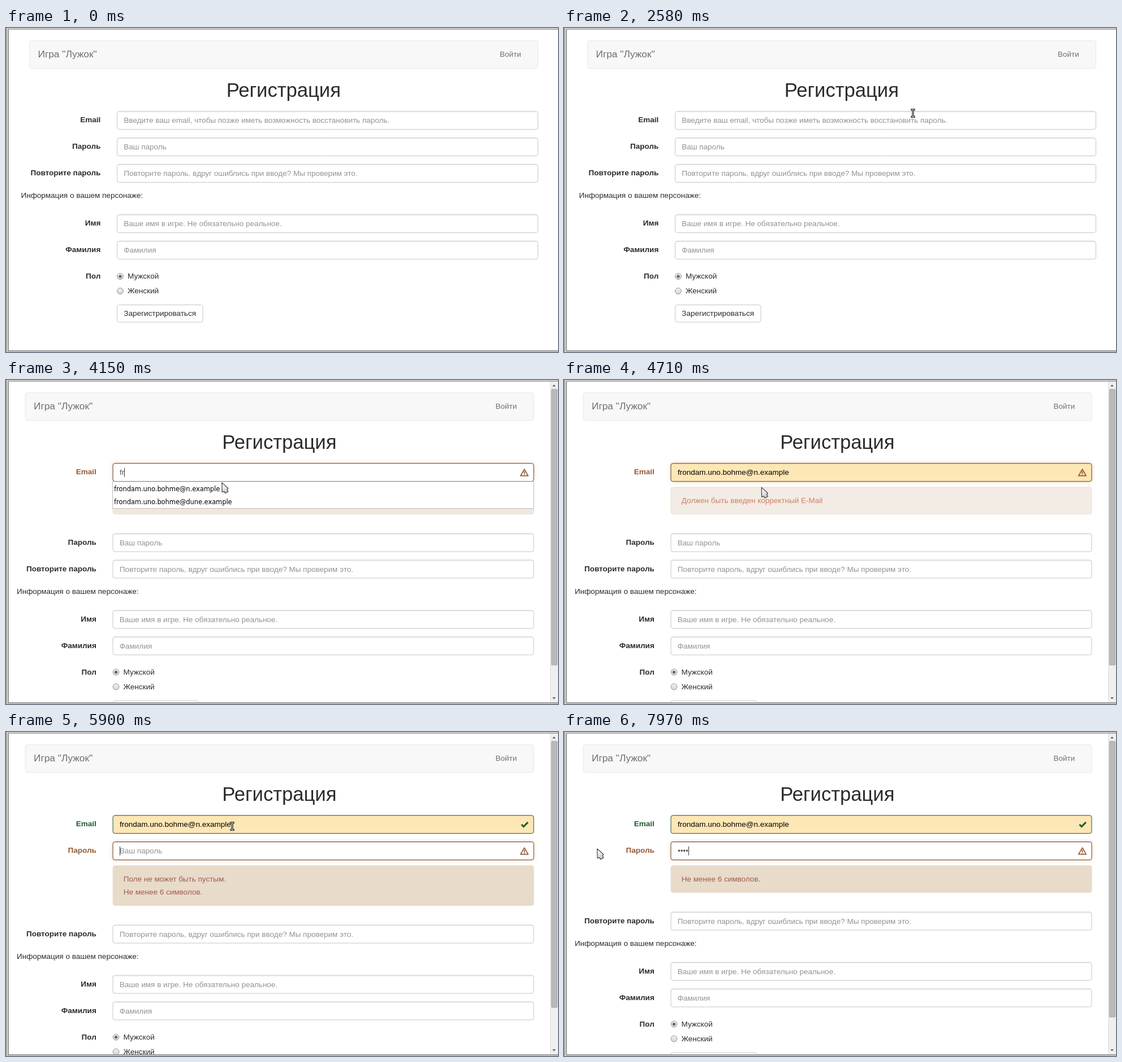
Animation, 976 px wide and 574 px high, one loop 8000 ms. Source, as an HTML page with a canvas:

```html
<!DOCTYPE html>
<html lang="ru">
<head>
<meta charset="utf-8">
<title>Регистрация</title>
<style>
html, body { margin: 0; width: 100%; height: 100%; overflow: hidden; background: #fff; }
canvas { display: block; width: 976px; height: 574px; }
</style>
</head>
<body>
<canvas id="stage"></canvas>
<script>
const W = 976, H = 574, LOOP = 8000;
const canvas = document.getElementById('stage');
const ctx = canvas.getContext('2d');
const dpr = window.devicePixelRatio || 1;
canvas.width = W * dpr;
canvas.height = H * dpr;

const SANS = '"Liberation Sans", Arial, sans-serif';
const TEXT = '13.5px ' + SANS;
const BOLD = 'bold ' + TEXT;
const MENU = '11.4px "DejaVu Sans", sans-serif';
const INK = '#2b2b2b', BROWN = '#935a33', GREEN = '#1e5c28';
const MAILS = ['frondam.uno.bohme@n.example', 'frondam.uno.bohme@dune.example'];

// Moments of the scenario, ms
const T = { focus: 3080, invalid: 3650, menu: 3860, pick: 4680, next: 5840, recheck: 7920 };
const MAIL_KEYS = [3650, 3800];
const PASS_KEYS = [7060, 7290, 7560, 7840];

// Pointer stops: time, x, y
const PATH = [
  [600, 720, 576], [1000, 592, 276], [1230, 606, 286], [1430, 606, 286],
  [1990, 720, 271], [2260, 720, 271], [2580, 617, 151], [2780, 617, 151],
  [3000, 600, 162], [3620, 600, 162], [4150, 381, 181], [4360, 340, 192],
  [4630, 340, 192], [5080, 439, 163], [5620, 439, 163], [5900, 400, 167],
  [6400, 58, 206], [LOOP, 58, 206]
];

const clamp = v => Math.max(0, Math.min(1, v));
const smooth = v => v * v * (3 - 2 * v);
const mix = (a, b, k) => a + (b - a) * k;
const mixRgb = (a, b, k) => `rgb(${a.map((v, i) => Math.round(mix(v, b[i], k)))})`;

function pointerAt(t) {
  const i = PATH.findIndex(p => p[0] > t);
  if (i < 1) return null;
  const [t0, x0, y0] = PATH[i - 1], [t1, x1, y1] = PATH[i];
  const k = smooth((t - t0) / (t1 - t0));
  return { x: mix(x0, x1, k), y: mix(y0, y1, k) };
}

function rect(x, y, w, h, color) {
  ctx.fillStyle = color;
  ctx.fillRect(x, y, w, h);
}

function box(x, y, w, h, r, fill, stroke) {
  ctx.beginPath();
  ctx.roundRect(x, y, w, h, r);
  ctx.fillStyle = fill;
  ctx.fill();
  if (stroke) {
    ctx.strokeStyle = stroke;
    ctx.lineWidth = 1;
    ctx.stroke();
  }
}

function text(str, x, y, color = INK, font = TEXT, align = 'left') {
  ctx.font = font;
  ctx.textAlign = align;
  ctx.fillStyle = color;
  ctx.fillText(str, x, y);
}

function poly(points, close) {
  ctx.beginPath();
  points.forEach(([x, y]) => ctx.lineTo(x, y));
  if (close) ctx.closePath();
}

function warnIcon(x, y) {
  ctx.strokeStyle = BROWN;
  ctx.lineWidth = 1.7;
  ctx.lineJoin = 'round';
  poly([[x, y - 5.5], [x + 6.7, y + 6], [x - 6.7, y + 6]], true);
  ctx.stroke();
  rect(x - 0.9, y - 1.8, 1.8, 4, BROWN);
  rect(x - 0.9, y + 3, 1.8, 1.5, BROWN);
}

function checkIcon(x, y) {
  ctx.strokeStyle = GREEN;
  ctx.lineWidth = 3;
  ctx.lineJoin = 'miter';
  poly([[x - 5.5, y + 0.2], [x - 1.8, y + 4], [x + 5.8, y - 3.8]]);
  ctx.stroke();
}

function field(label, y, hint, o = {}) {
  const labelColor = { warn: BROWN, ok: GREEN }[o.state] || INK;
  let border = { warn: '#66421f', ok: '#2b542c' }[o.state] || '#c6c6c6';
  if (o.focus && !o.state) border = mixRgb([198, 198, 198], [102, 175, 233], o.focus);
  text(label, 167.3, y + 19.5, labelColor, BOLD, 'right');
  if (o.focus) {
    ctx.save();
    ctx.shadowColor = o.state ? 'rgba(206,150,100,.5)' : `rgba(102,175,233,${0.4 * o.focus})`;
    ctx.shadowBlur = (o.state ? 7 : 3) * dpr;
    box(196.5, y, 744, 32, 3.8, '#fff');
    ctx.restore();
  }
  box(196.5, y, 744, 32, 3.8, o.fill || '#fff', border);
  rect(199, y + 0.7, 739, 1, 'rgba(0,0,0,.07)');
  const value = o.value || '';
  if (value) text(value, 208.4, y + 20.5, o.color || '#555');
  else text(hint, 208.2, y + 20.5, '#929292');
  if (o.caret) {
    ctx.font = TEXT;
    rect(Math.round(208 + ctx.measureText(value).width) + 0.5, y + 8, 1, 16, '#333');
  }
  if (o.state === 'warn') warnIcon(924, y + 16);
  if (o.state === 'ok') checkIcon(924.5, y + 16);
}

// A fresh alert is saturated, then settles to a pale tone
function alertBox(y, lines, age) {
  const k = 1 - (1 - clamp((age - 80) / 820)) ** 2;
  box(196.5, y, 744, 25 + 23 * lines.length - 0.5, 3.8,
    mixRgb([232, 219, 202], [242, 236, 229], k),
    mixRgb([232, 219, 202], [239, 220, 203], k));
  lines.forEach((s, i) =>
    text(s, 215.2, y + 27.8 + 23 * i, mixRgb([158, 92, 78], [207, 126, 98], k)));
}

function radio(label, y, on) {
  const g = ctx.createLinearGradient(0, y - 6, 0, y + 6);
  g.addColorStop(0, '#f4f4f4');
  g.addColorStop(1, '#d2d2d2');
  ctx.beginPath();
  ctx.arc(202, y, 5.4, 0, 7);
  ctx.fillStyle = g;
  ctx.fill();
  ctx.strokeStyle = '#929292';
  ctx.lineWidth = 1;
  ctx.stroke();
  if (on) {
    ctx.beginPath();
    ctx.arc(202, y, 2.6, 0, 7);
    ctx.fillStyle = '#636363';
    ctx.fill();
  }
  text(label, 215, y + 4);
}

function menu(hover) {
  box(196, 180, 744.5, 47.5, 0, '#fff', '#bdbdbd');
  if (hover) rect(196.5, 181, 743.5, 23, '#cdcdcd');
  MAILS.forEach((m, i) => text(m, 198.5, 197 + 23 * i, '#000', MENU));
}

function scrollbar(end) {
  rect(962, 3, 14, 568, '#efefef');
  rect(962, 3, 1, 568, '#dedede');
  box(964.5, 16.5, 10, end - 17, 1, '#b9b9b9', '#a8a8a8');
  ctx.fillStyle = '#666';
  poly([[966, 11.5], [972, 11.5], [969, 8]]);
  ctx.fill();
  poly([[966, 562], [972, 562], [969, 565.5]]);
  ctx.fill();
}

function frame() {
  rect(0, 0, W, 2, '#dcdad8');
  rect(0, 1.5, W, 1.5, '#a3a3a3');
  rect(0, 0, 3, H, '#dcdad8');
  rect(0, 0, 1, H, '#777');
  rect(3, 2, 2, H - 2, '#999');
  rect(3, 571, W, 2, '#999');
  rect(3, 573, W, 1, '#dcdad8');
}

function arrow(x, y) {
  ctx.save();
  ctx.translate(x, y);
  const g = ctx.createLinearGradient(0, 4, 11, 18);
  g.addColorStop(0, '#fff');
  g.addColorStop(1, '#c4c4c4');
  poly([[0.8, 0.8], [12, 10.8], [10, 12.8], [11.8, 16.8], [6.8, 19.6], [4.6, 16.4], [1, 17.6]], true);
  ctx.fillStyle = g;
  ctx.fill();
  ctx.strokeStyle = '#333';
  ctx.lineWidth = 1.1;
  ctx.lineJoin = 'round';
  ctx.stroke();
  ctx.restore();
}

// Dark outline with a pale core
function beam(x, y) {
  ctx.lineCap = 'square';
  for (const [color, width] of [['#1c1c1c', 3.2], ['#e8e8e8', 1]]) {
    ctx.strokeStyle = color;
    ctx.lineWidth = width;
    ctx.beginPath();
    for (const s of [-1, 1]) {
      ctx.moveTo(x - 2, y + 6.4 * s);
      ctx.lineTo(x + 2, y + 6.4 * s);
    }
    ctx.moveTo(x, y - 6.4);
    ctx.lineTo(x, y + 6.4);
    ctx.stroke();
  }
  ctx.lineCap = 'butt';
}

function draw(t) {
  const invalid = t >= T.invalid, done = t >= T.next, picked = t >= T.pick;
  const pointer = pointerAt(t);
  const menuOpen = t >= T.menu && !picked;
  const hover = menuOpen && pointer.y > 184;
  const lines = !done || t >= T.recheck
    ? ['Не менее 6 символов.']
    : ['Поле не может быть пустым.', 'Не менее 6 символов.'];
  const shift = invalid ? 54.5 + 23 * lines.length : 0;
  const dx = invalid ? -7.5 : 0;

  const keyTimes = [T.focus, T.next, ...MAIL_KEYS, ...PASS_KEYS].filter(k => k <= t);
  const lastKey = Math.max(...keyTimes);
  const blink = keyTimes.length > 0 && (t - lastKey) % 1000 < 500;
  const filled = picked || hover;
  const typed = 'fr'.slice(0, MAIL_KEYS.filter(k => k <= t).length);
  const dots = '•'.repeat(PASS_KEYS.filter(k => k <= t).length);

  ctx.setTransform(dpr, 0, 0, dpr, 0, 0);
  rect(0, 0, W, H, '#fff');
  ctx.save();
  ctx.translate(dx, 0);

  box(41.5, 22.5, 899, 49, 3.8, '#f8f8f8', '#e7e7e7');
  text('Игра "Лужок"', 56.5, 52.3, '#6f6f6f', '17.3px ' + SANS);
  text('Войти', 873, 51.3, '#707070');
  text('Регистрация', 490.8, 122, INK, '34.6px ' + SANS, 'center');

  field('Email', 147.7, 'Введите ваш email, чтобы позже иметь возможность восстановить пароль.', {
    state: done ? 'ok' : invalid ? 'warn' : '',
    focus: done ? 0 : clamp((t - T.focus) / 110),
    fill: filled ? '#fce7b5' : '#fff',
    value: filled ? MAILS[0] : typed,
    color: filled ? '#000' : '#555',
    caret: t >= T.focus && !filled && blink
  });
  if (invalid && !done) alertBox(190, ['Должен быть введен корректный E-Mail'], t - T.invalid);

  field('Пароль', 194.6 + (done ? 0 : shift), 'Ваш пароль', {
    state: done ? 'warn' : '',
    focus: done ? 1 : 0,
    value: dots,
    caret: done && blink
  });
  if (done) alertBox(236.8, lines, t - (t >= T.recheck ? T.recheck : T.next));

  field('Повторите пароль', 241.5 + shift, 'Повторите пароль, вдруг ошиблись при вводе? Мы проверим это.');
  text('Информация о вашем персонаже:', 26.5, 301.3 + shift);
  field('Имя', 330.6 + shift, 'Ваше имя в игре. Не обязательно реальное.');
  field('Фамилия', 377.5 + shift, 'Фамилия');
  text('Пол', 167.3, 444 + shift, INK, BOLD, 'right');
  radio('Мужской', 440 + shift, true);
  radio('Женский', 466 + shift, false);
  box(196.5, 490.5 + shift, 151.5, 30.5, 3.8, '#fff', '#c6c6c6');
  text('Зарегистрироваться', 208.3, 510.3 + shift);

  if (menuOpen) menu(hover);
  ctx.restore();

  if (invalid) scrollbar(lines.length > 1 ? 488.5 : 505.5);
  frame();

  if (pointer) {
    const { x, y } = pointer;
    const tops = [147, done ? 194 : 194 + shift, 241 + shift];
    const overField = x > 189 && x < 934 && tops.some(top => y > top && y < top + 33.5);
    const overMenu = menuOpen && y > 180;
    if (overField && !overMenu) beam(x, y);
    else arrow(x, y);
  }
}

function tick() {
  draw(performance.now() % LOOP);
  requestAnimationFrame(tick);
}
tick();
</script>
</body>
</html>
```
